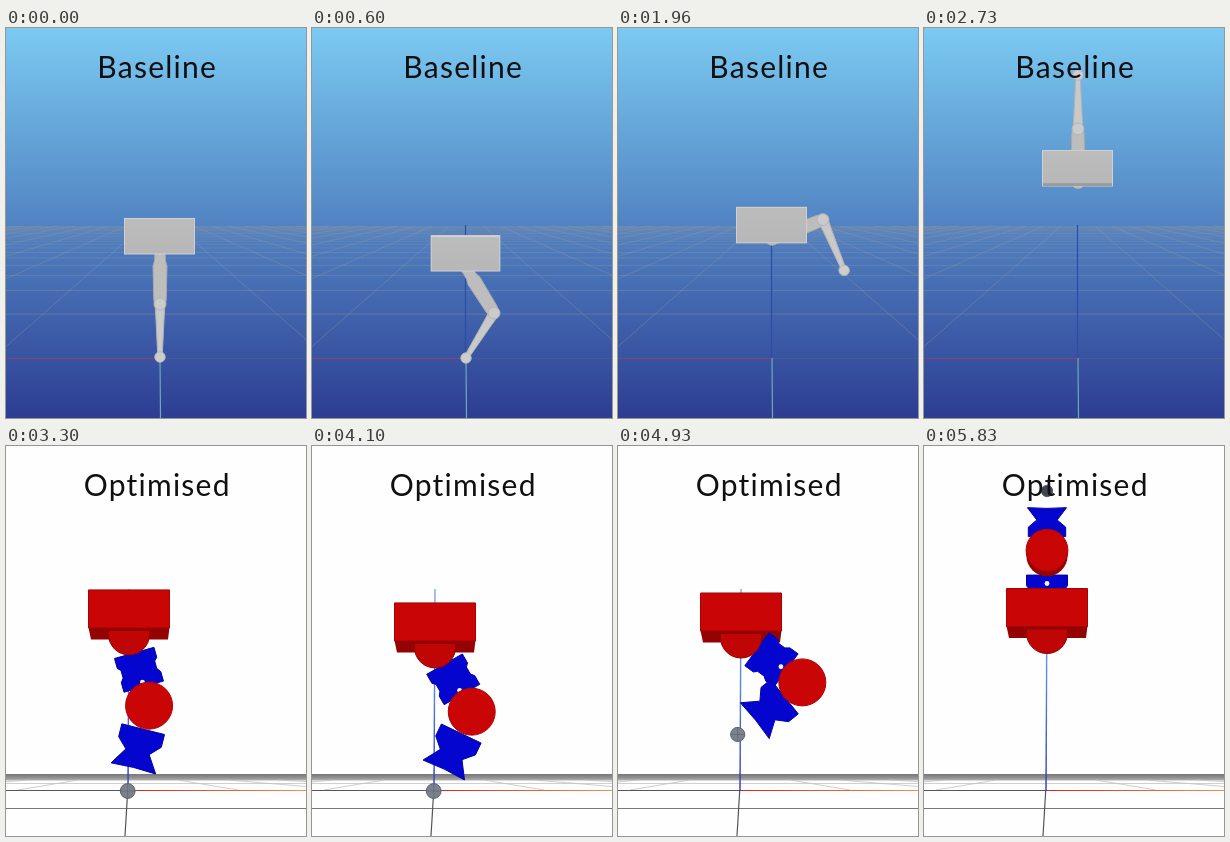
Write an HTML page with a canvas that moves like this. It is 300x390 px and loops after 5960 ms.

```html
<!DOCTYPE html>
<html lang="en">
<head>
<meta charset="utf-8">
<title>Jumping leg</title>
<style>
  html, body { margin: 0; width: 100%; height: 100%; overflow: hidden; }
  canvas { display: block; width: 300px; height: 390px; }
</style>
</head>
<body>
<canvas id="stage" width="300" height="390"></canvas>
<script>
const ctx = document.getElementById('stage').getContext('2d');
const LOOP = 5960, CUT = 2970;
const RAD = Math.PI / 180;

// stance: [ms, body top]; flight: [ms, body top, thigh deg, thigh length, shin deg, shin length]
const baseline = {
  hipX: 154, hipDrop: 33, footX: 154, footY: 330, l1: 53, l2: 53, lift: 1770,
  stance: [[0, 190], [100, 190.4], [330, 196], [700, 211], [1130, 226], [1350, 229], [1600, 222], [1770, 212]],
  flight: [[1960, 179, 111.4, 54.8, 22.4, 55], [2230, 140, 150, 54.5, 90, 55], [2480, 122, 180, 54, 180, 54]]
};
const optimised = {
  hipX: 123, hipDrop: 45, footX: 121.7, footY: 345, l1: 74, l2: 88, lift: 1700,
  stance: [[0, 141], [100, 141.3], [330, 143.4], [700, 149], [1130, 156.4], [1300, 158], [1500, 155], [1700, 150]],
  flight: [[1960, 146.5, 53.6, 76, -51.3, 83], [2230, 144, 125, 76, 55, 78], [2490, 142, 180, 79, 180, 63]]
};

// Smooth curve through one column of a key table
function sample(keys, t, col) {
  const n = keys.length - 1;
  if (t <= keys[0][0]) return keys[0][col];
  if (t >= keys[n][0]) return keys[n][col];
  let i = 0;
  while (t > keys[i + 1][0]) i++;
  const slope = j => j <= 0 || j >= n ? 0
    : (keys[j + 1][col] - keys[j - 1][col]) / (keys[j + 1][0] - keys[j - 1][0]);
  const [t0, t1] = [keys[i][0], keys[i + 1][0]];
  const h = t1 - t0, u = (t - t0) / h, v = 1 - u;
  return keys[i][col] * (1 + 2 * u) * v * v + slope(i) * h * u * v * v
    + keys[i + 1][col] * u * u * (3 - 2 * u) - slope(i + 1) * h * u * u * v;
}

// Two-link leg with the foot on the ground
function stand(r, top) {
  const dx = r.footX - r.hipX, dy = r.footY - top - r.hipDrop;
  const d = Math.min(Math.hypot(dx, dy), r.l1 + r.l2);
  const axis = Math.atan2(dx, dy);
  const bend = (p, q) => Math.acos(Math.min(1, (p * p + d * d - q * q) / (2 * p * d)));
  return [top, (axis + bend(r.l1, r.l2)) / RAD, r.l1, (axis - bend(r.l2, r.l1)) / RAD, r.l2];
}

function pose(r, t) {
  let p;
  if (t <= r.lift) {
    p = stand(r, sample(r.stance, t, 1));
  } else {
    const keys = [[r.lift, ...stand(r, sample(r.stance, r.lift, 1))], ...r.flight];
    p = [1, 2, 3, 4, 5].map(c => sample(keys, t, c));
  }
  const [top, aDeg, l1, bDeg, l2] = p;
  const a = aDeg * RAD, b = bDeg * RAD;
  const hip = [r.hipX, top + r.hipDrop];
  const knee = along(hip, a, l1);
  return { top, a, b, l1, l2, hip, knee, foot: along(knee, b, l2) };
}

function along([x, y], angle, d) {
  return [x + d * Math.sin(angle), y + d * Math.cos(angle)];
}

function line(x1, y1, x2, y2, color, width = 1) {
  ctx.strokeStyle = color;
  ctx.lineWidth = width;
  ctx.beginPath();
  ctx.moveTo(x1, y1);
  ctx.lineTo(x2, y2);
  ctx.stroke();
}

function disc([x, y], r, fill, edge) {
  ctx.beginPath();
  ctx.arc(x, y, r, 0, 2 * Math.PI);
  ctx.fillStyle = fill;
  ctx.fill();
  if (edge) { ctx.strokeStyle = edge; ctx.lineWidth = 1; ctx.stroke(); }
}

function poly(points, fill, edge) {
  ctx.beginPath();
  points.forEach(([x, y]) => ctx.lineTo(x, y));
  ctx.closePath();
  ctx.fillStyle = fill;
  ctx.fill();
  if (edge) { ctx.strokeStyle = edge; ctx.lineWidth = 1; ctx.stroke(); }
}

// Shape mirrored about a limb; points are [half width, distance along]
function limb(at, angle, half, fill, edge, sx = 1, sy = 1) {
  const s = Math.sin(angle), c = Math.cos(angle);
  const all = [...half, ...half.map(([v, u]) => [-v, u]).reverse()];
  poly(all.map(([v, u]) => [at[0] + v * sx * c + u * sy * s, at[1] - v * sx * s + u * sy * c]), fill, edge);
}

function title(text) {
  ctx.fillStyle = '#101010';
  ctx.font = '400 30px Lato, "Open Sans", sans-serif';
  ctx.letterSpacing = '1.25px';
  ctx.textAlign = 'center';
  ctx.fillText(text, 151.2, 50);
}

function gradient(y0, y1, ...colors) {
  const g = ctx.createLinearGradient(0, y0, 0, y1);
  colors.forEach((c, i) => g.addColorStop(i / (colors.length - 1), c));
  return g;
}

function blueWorld() {
  ctx.fillStyle = gradient(0, 390, '#7bcaf2', '#5284c3', '#2d3d92');
  ctx.fillRect(0, 0, 300, 390);
  const horizon = 183, far = 198, near = 2.35;
  const grey = 'rgba(145,150,158,.48)';
  for (let n = 1; n <= 20; n++) {
    const y = horizon + 147 * near / (near + n);
    line(0, y, 300, y, grey, n > 6 ? 0.6 : 0.8);
  }
  for (let n = -14; n <= 14; n++) {
    if (!n) continue;
    const at = y => 154 + n * 167 * (y - horizon) / 147;
    line(at(far), far, at(390), 390, grey, 0.8);
  }
  line(0, 330.5, 154, 330.5, '#87406f');
  line(154, 330.5, 300, 330.5, '#45627f', 0.8);
  line(154, 330, 154.5, 390, '#6cabb5', 1.2);
  line(153.5, 197, 153.5, 330, '#2c4ca9', 1.2);
}

function drawBaseline(t) {
  const p = pose(baseline, t), { top } = p;
  blueWorld();
  disc(p.hip, 6, '#b5b5b5');
  limb(p.hip, p.a, [[5, 0], [5.5, 10], [7, 15], [6.2, p.l1 - 4], [5, p.l1]], '#bdbdbd', '#aaaaaa');
  limb(p.knee, p.b, [[5, 0], [4.2, 12], [2.2, p.l2]], '#c9c9c9', '#b2b2b2');
  disc(p.knee, 6, '#cbcbcb', '#b3b3b3');
  disc(p.foot, 5.2, '#cdcdcd', '#b9b9b9');

  const lid = Math.max(1, (top - 183) * 0.09);
  const under = Math.max(0, (150 - top) * 0.1);
  const inset = Math.min(1.5, Math.max(0, (top - 190) * 0.04));
  const l = 118 + inset, r = 189 - inset;
  ctx.fillStyle = '#d0d0d0';
  ctx.fillRect(l, top, r - l, 36.5);
  ctx.fillStyle = gradient(top, top + 36, '#bcbcbc', '#b7b7b7');
  ctx.fillRect(l + 1, top + lid, r - l - 2, 35.5 - lid);
  if (under) {
    ctx.fillStyle = '#9b9b9b';
    ctx.fillRect(l + 1, top + 36 - under, r - l - 2, under);
  }
  title('Baseline');
}

function whiteWorld() {
  ctx.fillStyle = '#fefefe';
  ctx.fillRect(0, 0, 300, 390);
  ctx.fillStyle = gradient(328, 336, '#777777', '#939393', '#c8c8c8');
  ctx.fillRect(0, 328, 300, 6.5);
  for (let n = -4; n <= 4; n++) {
    if (n) line(122 + n * 50, 334, 122 + n * 110, 344, '#c2c2c2', 0.8);
  }
  line(0, 337.5, 300, 337.5, '#c4c4c4', 0.8);
  line(0, 344.5, 122, 344.5, '#55555f');
  const red = ctx.createLinearGradient(122, 0, 300, 0);
  red.addColorStop(0, '#d9251c');
  red.addColorStop(1, '#f0914a');
  line(122, 344.5, 300, 344.5, red, 1.2);
  line(0, 362.5, 300, 362.5, '#777777');
  line(121.7, 345, 119, 390, '#555555', 1.2);
  line(123, 143, 122, 345, gradient(143, 345, '#7fa6ee', '#5583e0', '#2a35c0'), 1.4);
}

function ball([x, y]) {
  const k = Math.min(1, Math.max(0, (y - 45) / 300));
  const shade = Math.round(62 + 62 * Math.min(1, k * 1.3));
  const r = 5.7 + 1.7 * k;
  disc([x, y], r, `rgb(${shade},${shade + 6},${shade + 16})`, '#5c6470');
  line(x - r, y, x + r, y, 'rgba(70,78,90,.45)', 0.8);
  line(x, y - r, x, y + r, 'rgba(70,78,90,.45)', 0.8);
}

function drawOptimised(t) {
  const p = pose(optimised, t), { top } = p;
  const blue = '#0505d0', navy = '#0303a0', red = '#c90505', dark = '#930303';
  whiteWorld();
  ball(p.foot);
  poly([[82.5, top + 38], [163.5, top + 38], [162, top + 50], [85, top + 50]], dark);

  limb(p.hip, p.a,
    [[20.5, 19.5], [20.5, 30], [17.5, 33], [17.5, 41], [20.5, 45], [20.5, 55], [7, 55]],
    blue, navy, 1, p.l1 / 75);
  disc(along(p.hip, p.a, 49.5), 2.4, '#f4f4fa');
  const slim = 0.85 + 0.15 * Math.min(1, Math.max(0, (p.l2 - 63) / 20));
  limb(p.knee, p.b, [[22, 24], [22, 37], [12, 47], [23, 64], [0, 63]], blue, navy, slim, p.l2 / 87);

  const [kx, ky] = p.knee;
  const lift = Math.max(0, (200 - ky) * 0.06);
  const kr = 20.9 + 2.6 * Math.min(1, Math.max(0, (ky - 108) / 125));
  const face = [kx, ky - lift * 0.7];
  if (lift) {
    disc([kx, face[1] + lift], kr - 0.3, dark);
    ctx.fillStyle = dark;
    ctx.fillRect(kx - kr + 0.3, face[1], 2 * kr - 0.6, lift);
  }
  disc(face, kr, red, '#b00404');

  ctx.beginPath();
  ctx.moveTo(102.5, top + 41);
  ctx.lineTo(143.5, top + 41);
  ctx.arc(123, top + 45, 20.5, 0, Math.PI);
  ctx.closePath();
  ctx.fillStyle = '#c00505';
  ctx.fill();
  ctx.strokeStyle = dark;
  ctx.lineWidth = 1;
  ctx.stroke();
  poly([[82.5, top + 0.5], [163.5, top + 0.5], [163.5, top + 38.5], [82.5, top + 38.5]], red, '#a50404');
  title('Optimised');
}

function frame(now) {
  const t = now % LOOP;
  if (t < CUT) drawBaseline(t);
  else drawOptimised(t - CUT);
  requestAnimationFrame(() => frame(performance.now() - start));
}
const start = performance.now();
frame(0);
</script>
</body>
</html>
```
